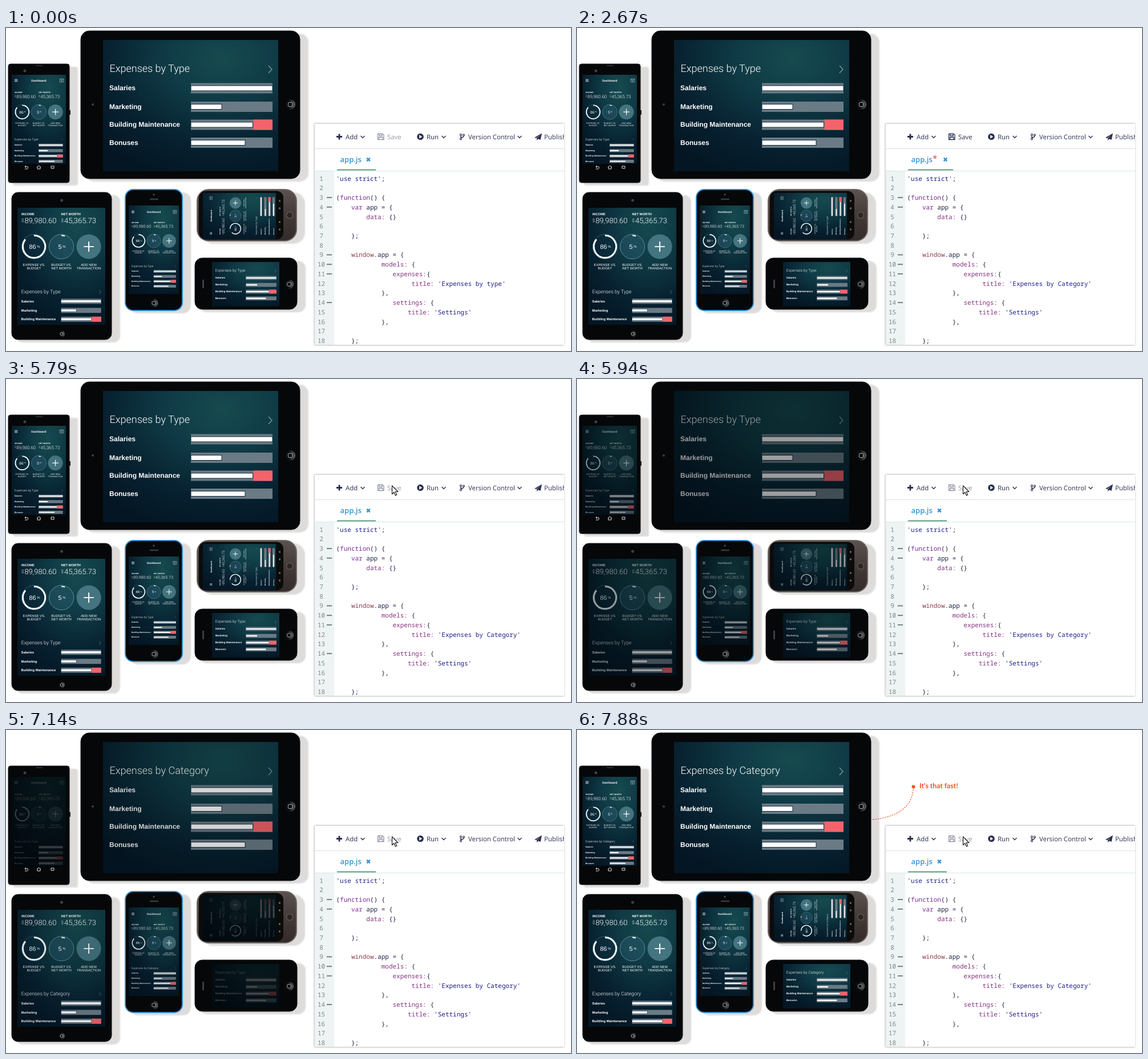
An HTML page that plays this animation: 990x566 px, repeating every 8840 ms.

```html
<!DOCTYPE html>
<html lang="en">
<head>
<meta charset="utf-8">
<style>
html, body { margin: 0; height: 100%; overflow: hidden; background: #fff; }
svg { display: block; width: 100vw; height: 100vh; text-rendering: geometricPrecision; }
.ui { font: 11.4px "Open Sans", sans-serif; fill: #2b3050; }
.tab { font-size: 13px; font-weight: 600; fill: #3993cf; }
.star { font-size: 15px; fill: #e0402c; }
.note { font: 700 12.2px Lato, sans-serif; fill: #f4511e; }
.code { font: 11px "Noto Sans Mono", monospace; fill: #1d2244; }
.num { fill: #80868c; text-anchor: middle; }
.str { fill: #1d1d88; }
.kw { fill: #7a2a92; }
.key { fill: #85337f; }
.glob { fill: #8a3f4a; }
.screen { font: 12px "Liberation Sans", Arial, sans-serif; fill: #fff; }
.light { font-family: Roboto, sans-serif; font-weight: 300; }
.bold { font-weight: 700; }
.mid { text-anchor: middle; }
</style>
</head>
<body>
<svg id="stage" viewBox="0 0 990 566"></svg>
<script>
const LOOP = 8840;
const INK = '#2b3050';
const $ = id => document.getElementById(id);
const rect = (x, y, w, h, r, fill, more = '') =>
  `<rect x="${x}" y="${y}" width="${w}" height="${h}" rx="${r}" fill="${fill}" ${more}/>`;
const circle = (x, y, r, fill, more = '') =>
  `<circle cx="${x}" cy="${y}" r="${r}" fill="${fill}" ${more}/>`;
const line = (d, color, width = 1, more = '') =>
  `<path d="${d}" fill="none" stroke="${color}" stroke-width="${width}" ${more}/>`;
const text = (x, y, s, cls = '', more = '') =>
  `<text x="${x}" y="${y}" class="${cls}" ${more}>${s}</text>`;

// App page in units of the largest screen; (0, 0) is the left middle of the chart title
function page() {
  const row = (label, y, value, over) =>
    text(-1, y + 3.5, label, 'bold') +
    rect(142, y - 9, 143, 18, 0, '#6a7b86') +
    rect(142, y - 4.5, value, 9, 0, '#fff', 'stroke="#12283a"') +
    (over ? rect(251.5, y - 9, 33.5, 18, 0, '#f4636b') : '');
  const amount = (x, label, value) =>
    text(x, -273, label, 'bold', 'font-size="11.6"') +
    text(x, -250, '$', 'light', 'font-size="16"') +
    text(x + 11, -244, value, 'light', 'font-size="26.5"');
  const caption = (x, a, b) => text(x, -92, a, 'mid') + text(x, -79, b, 'mid');
  const percent = (x, n) => text(x, -153, `${n}<tspan font-size="12" dy="-5"> %</tspan>`, 'mid', 'font-size="22"');
  const arc = (x, r, share, width) => line(`M${x} ${-161 - r}a${r} ${r} 0 1 1 -.1 0`, '#fff', width,
    `pathLength="100" stroke-dasharray="${share} 100"`);
  return line('M0 -353h18m-18 6h18m-18 6h18', '#fff', 2.5) +
    text(143, -341, 'Dashboard', 'bold mid', 'font-size="17"') +
    line('M267 -357h22v20h-22zm0 6h22m-11 3v8m-4-4h8', '#b9c9cc', 2) +
    amount(0, 'INCOME', '89,980.60') + amount(142, 'NET WORTH', '45,365.73') +
    circle(45, -161, 44, '#0d2c3c', 'fill-opacity=".45" stroke="#2f5f69" stroke-width="2"') +
    arc(45, 40, 86, 6) + percent(47, 86) + caption(45, 'EXPENSE VS.', 'BUDGET') +
    circle(143, -161, 44, '#2c5c70', 'fill-opacity=".45" stroke="#5d8d96" stroke-width="2"') +
    arc(143, 40, 5, 4) + percent(145, 5) + caption(143, 'BUDGET VS.', 'NET WORTH') +
    circle(241, -161, 44, '#4d7e8a', 'fill-opacity=".85"') +
    line('M223 -161h36m-18 -18v36', '#fff', 4) + caption(241, 'ADD NEW', 'TRANSACTION') +
    text(-.5, 6, '', 'light title', 'font-size="18"') +
    line('M278 -5l6 6.5l-6 6.5', '#7f979d', 1.3) +
    row('Salaries', 34.5, 143) + row('Marketing', 67, 54) +
    row('Building Maintenance', 98.5, 108.5, true) + row('Bonuses', 130, 95);
}

const homeKey = (x, y, r) => circle(x, y, r, 'url(#key)') +
  rect(x - r * .4, y - r * .4, r * .8, r * .8, r * .2, '#0b0b0d', 'stroke="#b5b5b5"');

// body: x y w h r; view: x y w h; at: title x y, scale, turn; dim: fade depth, depth before return; back: return start, end
const devices = [
  { body: [131, 5, 384, 259, 15], view: [170, 21, 307, 230], at: [182, 71, 1, 0], dim: [.7, .7], back: [6960, 7200],
    parts: circle(152, 134, 2, '#3b3f48') + homeKey(498, 134, 9) },
  { body: [4, 63, 107, 208, 4], view: [10, 82, 95, 156], at: [15, 195, .297, 0], dim: [.75, .75], back: [7140, 7410],
    parts: circle(33, 75, 2.5, '#3c414a') + line('M52 66h12', '#33363c', 1.5) + rect(111, 144, 2, 8, 0, '#222') +
      line('M36 247h-3m5-4h-5l2-2m-2 2l2 2m3-2q2 4-2 4M54 244l3.500-3l3.500 3m-6-1v4h5v-4M79 242h5v4h-5z', '#e2e2e2') },
  { body: [10, 288, 175, 258, 11], view: [20, 315, 154, 205], at: [27, 462, .49, 0], dim: [.7, .7], back: [6960, 7170],
    parts: circle(97.5, 302, 2.5, '#3c414a') + homeKey(97.5, 536, 5.5) },
  { body: [209, 283, 100, 212, 14], view: [215, 311, 88, 155], at: [220, 417, .273, 0], dim: [.7, .7], back: [6960, 7185],
    edge: '#2f8fd2', parts: circle(259, 292, 1.5, '#555') + line('M252 300h15', '#3a3a3e', 2.5) + homeKey(259, 482, 7.5) },
  { body: [335, 283, 174, 90, 20], view: [345, 289, 128, 81], at: [439, 362, .23, -90], dim: [.6, .72], back: [7140, 7410],
    fill: 'url(#metal)', edge: '#6e6663',
    parts: rect(338, 285.5, 148, 85, 12, '#0c0b0c') + circle(497, 328, 5.5, '#2a2624', 'stroke="#5d5551" stroke-width="1.5"') +
      [303, 316, 340, 353].map(y => circle(479.5, y, 1.7, '#666')).join('') },
  { body: [331, 403, 179, 90, 13], view: [361, 410, 118, 78], at: [367, 425, .375, 0], dim: [.5, .72], back: [7140, 7410],
    parts: line('M345.500 441v15', '#45484e', 2.5) + homeKey(496, 449, 8) }
];

function drawDevice(d, i) {
  const [x, y, w, h, r] = d.body, [sx, sy, sw, sh] = d.view, [ox, oy, scale, turn] = d.at;
  return rect(x + 8, y + 5, w + 7, h, r, '#dddcda', 'filter="url(#soft)"') +
    rect(x, y, w, h, r, d.fill || '#060709', `stroke="${d.edge || '#15171a'}" stroke-width="${d.edge ? 2 : 1}"`) + d.parts +
    `<clipPath id="clip${i}">${rect(sx, sy, sw, sh, 0, '#000')}</clipPath>
    <g class="screen" clip-path="url(#clip${i})">${rect(sx, sy, sw, sh, 0, 'url(#sea)')}
    <g transform="translate(${ox} ${oy}) rotate(${turn}) scale(${scale})">${page()}</g>
    ${rect(sx, sy, sw, sh, 0, '#020609', 'class="shade"')}</g>`;
}

const X0 = 578.5, CW = 6.6, lineY = n => 267.6 + 16.73 * (n - 1);
const source = `'use strict';

(function() {
    var app = {
        data: {}

    };

    window.app = {
            models: {
               expenses:{
                    title:
            },
               settings: {
                   title: 'Settings'
            },

    };`.split('\n');
const classes = [[/^'/, 'str'], [/^(function|var)$/, 'kw'], [/^window$/, 'glob'], [/:$/, 'key']];
const paint = s => s.replace(/'[^']*'|\w+:|\b(?:function|var|window)\b/g, m =>
  `<tspan class="${classes.find(c => c[0].test(m))[1]}">${m}</tspan>`);

function drawEditor() {
  const chevron = x => line(`M${x - 3.5} 189l3.500 3.500l3.500-3.500`, INK, 1.4);
  const code = source.map((s, i) => {
    const indent = s.search(/\S|$/), y = lineY(i + 1);
    return text(552.5, y, i + 1, 'num') + text(X0 + CW * indent, y, paint(s.trim())) +
      (/[{]$/.test(s) ? rect(562, y - 5, 9, 2, 0, '#6d8580') : '');
  }).join('');
  return rect(540, 167, 438, 389, 2, '#bbb', 'filter="url(#glow)"') +
    `<clipPath id="pane">${rect(541, 168, 437, 387, 0, '#000')}</clipPath><g clip-path="url(#pane)">` +
    rect(541, 168, 437, 387, 0, '#fff') + rect(541, 251, 34, 304, 0, '#eef3f3') +
    line('M541 211.500h437', '#dcdfe2') + line('M541 250.500h437', '#d3e8ea') +
    rect(642, 178, 60, 25, 3, '#f1f2f4', 'id="hover"') +
    '<g class="ui">' + line('M579 190.500h10m-5-5v10', INK, 2.8) + text(595, 194.5, 'Add') + chevron(625) +
    '<g id="save">' + line('M651.500 185.500h8.500l2 2v8h-10.500zm2.500 0v3.500h5v-3.500m-5.500 10v-4h6.500v4', INK, 1.3) +
    text(668, 194.5, 'Save') + '</g>' +
    circle(726, 190.5, 5.8, INK) + '<path d="M724.200 187.300l5 3.200l-5 3.200z" fill="#fff"/>' +
    text(737, 194.5, 'Run') + chevron(767) +
    line('M797 188v5m5-4.500q0 3-5 4', INK, 1.5) +
    [[797, 187], [797, 194.5], [802, 187.5]].map(p => circle(...p, 1.5, '#fff', `stroke="${INK}" stroke-width="1.2"`)).join('') +
    text(810, 194.5, 'Version Control') + chevron(900) +
    '<path d="M926 192l13-7.500l-2.500 11.500l-4-1.700l-2.500 2.700v-4l6.500-6l-7.500 6z"/>' + text(943, 194.5, 'Publish') +
    text(585.5, 235, 'app.js', 'tab') + text(623, 234, '*', 'star', 'id="star"') + '</g>' +
    line('M-2.800 -2.800l5.600 5.600m0 -5.600l-5.600 5.600', '#3993cf', 2.4, 'id="close"') +
    rect(580, 247.5, 68, 2, 0, '#5f9d7c', 'id="tab"') +
    `<g class="code">${code}${text(X0 + CW * 27, lineY(12), '', 'str', 'id="value"')}</g>` +
    rect(0, 439, 1.5, 17, 0, '#111', 'id="caret"') + '</g>';
}

$('stage').innerHTML = `<defs>
  <radialGradient id="sea" cx=".68" cy=".14" r=".95">
    <stop offset="0" stop-color="#164a4f"/><stop offset=".35" stop-color="#0f3a45"/>
    <stop offset=".7" stop-color="#072130"/><stop offset="1" stop-color="#041624"/></radialGradient>
  <linearGradient id="key"><stop offset=".4" stop-color="#0c0d0f"/><stop offset="1" stop-color="#606266"/></linearGradient>
  <linearGradient id="metal" x2="0" y2="1"><stop offset="0" stop-color="#5b524f"/>
    <stop offset=".5" stop-color="#443a38"/><stop offset="1" stop-color="#332b29"/></linearGradient>
  <filter id="soft"><feGaussianBlur stdDeviation="1"/></filter>
  <filter id="glow"><feGaussianBlur stdDeviation="1.5"/></filter></defs>` +
  devices.map(drawDevice).join('') + drawEditor() +
  `<g id="note">${circle(589.5, 99.5, 3, '#f4511e')}${line('M589 104C587 134 562 153 517 157', '#f4511e', 1.1, 'stroke-dasharray="2.500 1.800"')}
  ${text(600, 102, 'It\'s that fast!', 'note')}</g>
  <path id="mouse" d="M0 0v14.500l3.300-3l2.500 5.500l2.400-1l-2.500-5.500h4.600z" fill="#fff" stroke="#111" stroke-width="1.1"/>`;

const titles = document.querySelectorAll('.title'), shades = document.querySelectorAll('.shade');
const typed = [30, 290, 710, 910, 1040, 1200, 1260, 1490];
const deleted = [1950, 2050, 2210, 2510];
const carets = [[30, 550], [710, 1890], [1950, 2670], [3400, 3930]];
const count = (times, t) => times.filter(s => t >= s).length;
const ramp = (t, a, b) => Math.min(1, Math.max(0, (t - a) / (b - a)));
const show = (id, on) => $(id).setAttribute('opacity', +on);

function render(t) {
  const n = count(typed, t), dirty = t >= 30 && t < 4000;
  $('value').textContent = `'Expenses by ${'Category'.slice(0, n)}${'type'.slice(count(deleted, t))}'`;
  $('caret').setAttribute('x', X0 + CW * (40 + n) - .5);
  show('caret', carets.some(([a, b]) => t >= a && t < b));

  show('star', dirty);
  show('save', dirty ? 1 : .5);
  $('close').setAttribute('transform', `translate(${dirty ? 645.5 : 635} 230.500)`);
  $('tab').setAttribute('width', dirty ? 79 : 68);
  show('hover', t >= 3660 && t < 4190);

  const p = ramp(t, 2970, 3750), e = p * p * (3 - 2 * p);
  $('mouse').setAttribute('transform', `translate(${936 - 259.5 * e} ${432 - 245 * e})`);
  show('mouse', t >= 2970);

  devices.forEach(({ dim: [low, last], back: [from, to] }, i) => {
    const depth = low + (last - low) * ramp(t, 6960, 7140);
    shades[i].setAttribute('opacity', depth * ramp(t, 5790, 6060) * (1 - ramp(t, from, to)));
    titles[i].textContent = 'Expenses by ' + (t >= from + 30 ? 'Category' : 'Type');
  });
  show('note', ramp(t, 7580, 7880));
}

const start = performance.now();
function tick() {
  render((performance.now() - start) % LOOP);
  requestAnimationFrame(tick);
}
tick();
</script>
</body>
</html>
```
